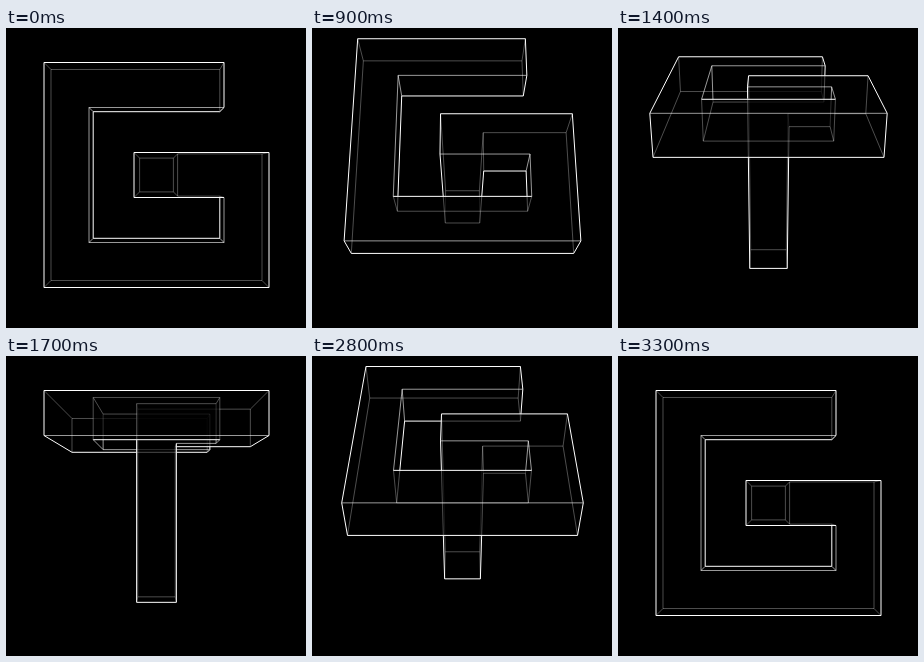
Write an HTML page with a canvas that moves like this. It is 300 px wide and 300 px high and loops after 3400 ms.

```html
<!DOCTYPE html>
<html lang="en">
<head>
<meta charset="utf-8">
<title>Turning letter block</title>
<style>
html, body { margin: 0; width: 100%; height: 100%; overflow: hidden; background: #000; }
canvas { display: block; }
</style>
</head>
<body>
<canvas id="stage" width="300" height="300"></canvas>
<script>
const ctx = document.getElementById('stage').getContext('2d');
const LOOP = 3400, STEP = 100;
const CENTER = { x: 150.5, y: 147 }, DISTANCE = 17.6, FOCAL = 45 * (DISTANCE - 2.5);
const SILHOUETTE = 1, CREASE = 0.6, VEIL = 0.3, SAMPLES = 120;

// The block lives in a 5 x 5 x 5 cube; z grows away from the viewer.
const G = [[0, 0], [4, 0], [4, 1], [1, 1], [1, 4], [4, 4], [4, 3], [2, 3], [2, 2], [5, 2], [5, 5], [0, 5]];
const faces = [];
const addFace = (axis, sign, points) => faces.push({ axis, sign, points, value: points[0][axis] });
const atDepth = (points, z) => points.map(([x, y]) => [x, y, z]);

addFace(2, -1, atDepth(G, 0));
addFace(2, 1, atDepth(G.map(([x, y]) => [x === 2 ? 3 : x, y]), 1));
addFace(2, 1, atDepth([[2, 2], [3, 2], [3, 3], [2, 3]], 5));
addFace(0, 1, [[3, 2, 1], [3, 3, 1], [3, 3, 5], [3, 2, 5]]);
G.forEach((a, i) => {
  const b = G[(i + 1) % G.length];
  const axis = a[0] === b[0] ? 0 : 1;
  const sign = axis ? Math.sign(a[0] - b[0]) : Math.sign(b[1] - a[1]);
  const touchesStem = a[0] === 2 || b[0] === 2;
  if (!touchesStem) {
    addFace(axis, sign, [[...a, 0], [...b, 0], [...b, 1], [...a, 1]]);
  } else if (axis === 0) {
    addFace(0, sign, [[2, 3, 0], [2, 2, 0], [2, 2, 5], [2, 3, 5]]);
  } else {
    const y = a[1], end = Math.max(a[0], b[0]);
    addFace(1, sign, [[end, y, 0], [2, y, 0], [2, y, 5], [3, y, 5], [3, y, 1], [end, y, 1]]);
  }
});

const edges = new Map();
for (const face of faces) {
  face.points.forEach((a, i) => {
    const b = face.points[(i + 1) % face.points.length];
    const key = [a, b].map(String).sort().join(' ');
    if (!edges.has(key)) edges.set(key, { a, b, faces: [] });
    edges.get(key).faces.push(face);
  });
}

const mix = (a, b, t) => a.map((v, i) => v + (b[i] - v) * t);

function inside(point, { axis, points }) {
  const [u, v] = [0, 1, 2].filter(k => k !== axis);
  let hit = false;
  points.forEach((a, i) => {
    const b = points[(i + 1) % points.length];
    if ((a[v] > point[v]) !== (b[v] > point[v]) &&
        point[u] < a[u] + (b[u] - a[u]) * (point[v] - a[v]) / (b[v] - a[v])) hit = !hit;
  });
  return hit;
}

function hides(face, eye, point) {
  const t = (face.value - eye[face.axis]) / (point[face.axis] - eye[face.axis]);
  return t > 0 && t < 0.9995 && inside(mix(eye, point, t), face);
}

function draw(angle) {
  const c = Math.cos(angle), s = Math.sin(angle);
  const eye = [2.5, 2.5 + DISTANCE * s, 2.5 - DISTANCE * c];
  const project = ([x, y, z]) => {
    const dy = y - 2.5, dz = 2.5 - z;
    const scale = FOCAL / (DISTANCE - dz * c - dy * s);
    return [CENTER.x + (x - 2.5) * scale, CENTER.y + (dy * c - dz * s) * scale];
  };
  const facing = new Set(faces.filter(f => f.sign * (eye[f.axis] - f.value) > 0));

  ctx.fillStyle = '#000';
  ctx.fillRect(0, 0, 300, 300);
  ctx.strokeStyle = '#fff';
  ctx.lineWidth = 1;

  const strokes = [];
  for (const { a, b, faces: sides } of edges.values()) {
    const base = sides.every(f => facing.has(f)) ? CREASE : SILHOUETTE;
    const layersAt = i => {
      const point = mix(a, b, (i + 0.5) / SAMPLES);
      return [...facing].filter(f => hides(f, eye, point)).length;
    };
    // Join samples under the same number of faces into one stroke.
    let start = 0, layers = layersAt(0);
    for (let i = 1; i <= SAMPLES; i++) {
      const next = i < SAMPLES ? layersAt(i) : -1;
      if (next === layers) continue;
      strokes.push({
        alpha: base * VEIL ** layers,
        from: project(mix(a, b, start / SAMPLES)),
        to: project(mix(a, b, i / SAMPLES))
      });
      start = i;
      layers = next;
    }
  }
  strokes.sort((p, q) => p.alpha - q.alpha);
  for (const { alpha, from, to } of strokes) {
    ctx.globalAlpha = alpha;
    ctx.beginPath();
    ctx.moveTo(...from);
    ctx.lineTo(...to);
    ctx.stroke();
  }
  ctx.globalAlpha = 1;
}

const ramp = (t, start, duration) => Math.min(1, Math.max(0, (t - start) / duration));
const turnAt = t => ramp(t, 656, 1006) - ramp(t, 2322, 957);

let shown = -1;
function tick() {
  const t = Math.floor(performance.now() % LOOP / STEP) * STEP;
  const turn = turnAt(t);
  if (turn !== shown) draw(turn * Math.PI / 2);
  shown = turn;
  requestAnimationFrame(tick);
}
tick();
</script>
</body>
</html>
```
